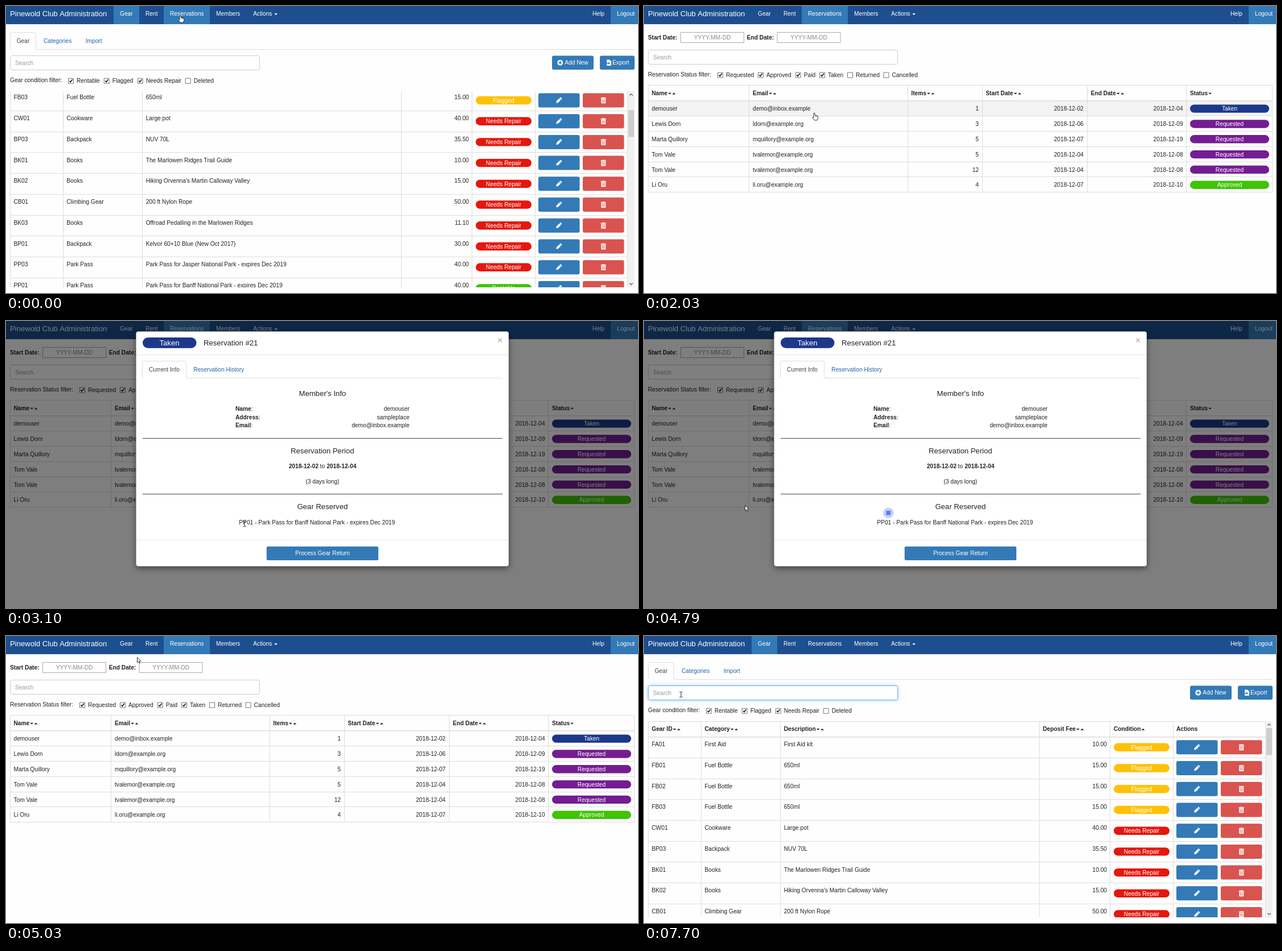
These frames come from a looping animation (1110x505 px, 8000 ms). An HTML page with a canvas:

```html
<!DOCTYPE html>
<html lang="en">
<head>
<meta charset="utf-8">
<title>Club administration</title>
<style>
html, body { margin: 0; width: 100%; height: 100%; overflow: hidden; background: #fefefe; }
canvas { display: block; }
</style>
</head>
<body>
<canvas id="stage" width="1110" height="505"></canvas>
<script>
const W = 1110, H = 505, LOOP = 8000;
const FACE = '"Liberation Sans", Arial, sans-serif';
const BODY = `10.2px ${FACE}`, BOLD = `bold 10.2px ${FACE}`, TITLE = `13.1px ${FACE}`;
const PAPER = '#fefefe', INK = '#222', NAVY = '#1d4f8f', BLUE = '#337ab7', RED = '#d9534f';
const LINK = '#2166ad', RULE = '#ddd', MUTED = '#999';
const PILLS = {
  Flagged: '#ffc107', 'Needs Repair': '#e6170c', Rentable: '#3fc406',
  Taken: '#1c388a', Requested: '#741c92', Approved: '#3fc406'
};

const gear = [
  ['FA01', 'First Aid', 'First Aid kit', '10.00'],
  ['FB01', 'Fuel Bottle', '650ml', '15.00'],
  ['FB02', 'Fuel Bottle', '650ml', '15.00'],
  ['FB03', 'Fuel Bottle', '650ml', '15.00'],
  ['CW01', 'Cookware', 'Large pot', '40.00'],
  ['BP03', 'Backpack', 'NUV 70L', '35.50'],
  ['BK01', 'Books', 'The Marlowen Ridges Trail Guide', '10.00'],
  ['BK02', 'Books', "Hiking Orvenna's Martin Calloway Valley", '15.00'],
  ['CB01', 'Climbing Gear', '200 ft Nylon Rope', '50.00'],
  ['BK03', 'Books', 'Offroad Pedalling in the Marlowen Ridges', '11.10'],
  ['BP01', 'Backpack', 'Kelvor 60+10 Blue (New Oct 2017)', '30.00'],
  ['PP03', 'Park Pass', 'Park Pass for Jasper National Park - expires Dec 2019', '40.00'],
  ['PP01', 'Park Pass', 'Park Pass for Banff National Park - expires Dec 2019', '40.00']
];
const condition = i => i < 4 ? 'Flagged' : i < 12 ? 'Needs Repair' : 'Rentable';

const member = { name: 'demouser', address: 'sampleplace', email: 'demo@inbox.example' };
const bookings = [
  [member.name, member.email, '1', '02', '04', 'Taken'],
  ['Lewis Dorn', 'ldorn@example.org', '3', '06', '09', 'Requested'],
  ['Marta Quillory', 'mquillory@example.org', '5', '07', '19', 'Requested'],
  ['Tom Vale', 'tvalemor@example.org', '5', '04', '08', 'Requested'],
  ['Tom Vale', 'tvalemor@example.org', '12', '04', '08', 'Requested'],
  ['Li Oru', 'li.oru@example.org', '4', '07', '10', 'Approved']
];

// Pointer stops: start time, shape, x, y
const pointer = [
  [0, 'hand', 306, 16], [650, 'arrow', 313, 102], [790, 'hand', 300, 205], [930, 'hand', 296, 220],
  [1050, 'hand', 289, 231], [1170, 'hand', 286, 228], [1300, 'hand', 284, 215], [1420, 'hand', 283, 203],
  [1540, 'hand', 282, 191], [1910, 'hand', 286, 185], [2030, 'hand', 299, 188],
  [2280, 'arrow', 305, 202], [2400, 'arrow', 320, 235], [2540, 'arrow', 351, 288], [2710, 'arrow', 446, 371],
  [2860, 'arrow', 440, 369], [2980, 'beam', 428, 361], [3100, 'beam', 419, 357],
  [3470, 'beam', 424, 356], [3590, 'beam', 418, 352], [3710, 'arrow', 385, 345], [3830, 'arrow', 335, 333],
  [3950, 'arrow', 280, 320], [4070, 'arrow', 230, 307], [4190, 'arrow', 194, 301], [4310, 'arrow', 184, 308],
  [4430, 'arrow', 179, 316], [4550, 'arrow', 177, 324], [4910, 'arrow', 205, 180],
  [5030, 'arrow', 230, 37], [5150, 'hand', 222, 11], [5320, 'hand', 211, 10],
  [6210, 'arrow', 160, 43], [6350, 'hand', 138, 58], [6470, 'arrow', 106, 78],
  [6590, 'beam', 78, 95], [6710, 'beam', 60, 102], [7210, 'beam', 65, 103]
];
// Dialog stops: start time, opacity, vertical shift
const dialogStops = [[0, 0, 0], [2280, .32, -78], [2400, 1, -26], [2540, 1, 0], [4910, .3, -52], [5030, 0, 0]];

const stage = document.getElementById('stage').getContext('2d');
let c = stage;

const at = (stops, t) => stops.findLast(s => s[0] <= t);

function text(s, x, y, color = INK, align = 'left', font = BODY) {
  c.font = font;
  c.fillStyle = color;
  c.textAlign = align;
  c.fillText(s, x, y + (font === TITLE ? 4.6 : 3.7));
  return c.measureText(s).width;
}

function rect(x, y, w, h, color) {
  c.fillStyle = color;
  c.fillRect(x, y, w, h);
}

function box(x, y, w, h, r, fill, stroke) {
  c.beginPath();
  c.roundRect(x, y, w, h, r);
  if (fill) { c.fillStyle = fill; c.fill(); }
  if (stroke) { c.strokeStyle = stroke; c.lineWidth = 1; c.stroke(); }
}

function shape(points, fill, stroke) {
  c.beginPath();
  points.forEach(([x, y]) => c.lineTo(x, y));
  c.closePath();
  c.fillStyle = fill;
  c.fill();
  if (stroke) { c.strokeStyle = stroke; c.lineWidth = .9; c.stroke(); }
}

const hline = (x1, x2, y, color = RULE, w = 1) => rect(x1, Math.round(y), x2 - x1, w, color);
const vline = (x, y1, y2) => rect(x, y1, 1, y2 - y1, RULE);

function disc(x, y, r, color) {
  c.beginPath();
  c.arc(x, y, r, 0, 7);
  c.fillStyle = color;
  c.fill();
}

function caret(x, y, dir, color = INK) {
  shape([[x - 2.9, y - 1.4 * dir], [x + 2.9, y - 1.4 * dir], [x, y + 1.5 * dir]], color);
}

// dirs lists the sort carets: 1 points down, -1 points up
function heading(s, x, y, dirs) {
  const end = x + text(s, x, y, INK, 'left', BOLD);
  dirs.forEach((d, i) => caret(end + 4 + 7.3 * i, y + .8, d));
}

function pill(label, x, y, w) {
  box(x, y - 7.2, w, 14.4, 7.2, PILLS[label]);
  text(label, x + w / 2, y, '#fff', 'center');
}

function checkbox(x, y, label, on) {
  box(x - 4.5, y - 4, 9, 9, 0, '#fff', '#777');
  if (on) {
    c.beginPath();
    c.moveTo(x - 2.6, y + .4);
    c.lineTo(x - .7, y + 2.5);
    c.lineTo(x + 2.8, y - 2.2);
    c.strokeStyle = '#111';
    c.lineWidth = 1.5;
    c.stroke();
  }
  text(label, x + 10, y);
}

function searchBox(y, glow = 0) {
  if (glow) {
    c.save();
    c.shadowColor = `rgba(102,175,233,${.7 * glow})`;
    c.shadowBlur = 6;
    box(7.5, y, 438, 25, 3, '#fff');
    c.restore();
  }
  box(7.5, y, 438, 25, 3, '#fff', glow > .9 ? '#66afe9' : glow ? '#99bddb' : '#ccc');
  text('Search', 16, y + 12.3, MUTED);
}

function tab(x, w, top, label, left, right, color) {
  const base = top + 30;
  hline(left, right, base);
  box(x + .5, top + .5, w, 32, [3, 3, 0, 0], null, RULE);
  rect(x - 1, base, w + 3, 4, color);
  hline(left, x, base);
  hline(x + w + 1, right, base);
  text(label, x + .5 + w / 2, top + 15.3, '#444', 'center');
}

function navbar(active, hovered) {
  rect(0, 0, W, 32, NAVY);
  const items = [['Gear', 189, 45], ['Rent', 234, 43], ['Reservations', 277, 81], ['Members', 358, 64], ['Actions', 423, 65]];
  text('Pinewold Club Administration', 7, 13.5, '#fff', 'left', TITLE);
  for (const [label, x, w] of items) {
    if (label === active || label === hovered) rect(x, 0, w, 32, BLUE);
    text(label, x + 11, 13.5, '#fff');
  }
  caret(474, 14.5, 1, '#fff');
  rect(1062, 0, 48, 32, BLUE);
  text('Help', 1030, 13.5, '#fff');
  text('Logout', 1073, 13.5, '#fff');
}

function pencil(x, y) {
  c.save();
  c.translate(x, y);
  c.rotate(-Math.PI / 4);
  shape([[-6.6, 0], [-4, -2], [3, -2], [3, 2], [-4, 2]], '#fff');
  rect(3.7, -2, 2.3, 4, '#fff');
  c.restore();
}

function trash(x, y) {
  rect(x - 1.7, y - 5.5, 3.4, 1, '#fff');
  rect(x - 4.7, y - 4.7, 9.4, 1.5, '#fff');
  box(x - 4, y - 2.6, 8, 8, [0, 0, 1, 1], '#fff');
  for (const dx of [-2.3, -.4, 1.5]) rect(x + dx, y - 1.4, .8, 5.4, RED);
}

function gearTable(scroll) {
  const PITCH = 36.72, cols = [7, 100, 239, 694, 818, 929, 1091];
  c.save();
  c.beginPath();
  c.rect(0, 150, 1092, 345);
  c.clip();
  c.translate(0, -scroll);
  hline(7, 1091, 150);
  hline(7, 1091, 177, RULE, 1.5);
  const both = [1, -1], y = 163.5;
  heading('Gear ID', 13.5, y, both);
  heading('Category', 106.5, y, both);
  heading('Description', 245.7, y, both);
  heading('Deposit Fee', 700.5, y, both);
  heading('Condition', 825, y, [-1]);
  heading('Actions', 935, y, []);
  gear.forEach(([id, kind, info, fee], i) => {
    const top = 177.6 + PITCH * i, mid = top + 18.2;
    text(id, 13.5, top + 13);
    text(kind, 106.5, top + 13);
    text(info, 245.7, top + 13);
    text(fee, 813, top + 13, INK, 'right');
    pill(condition(i), 825, mid, 98);
    box(935, mid - 12.5, 72.5, 25, 3, BLUE);
    box(1013, mid - 12.5, 72.5, 25, 3, RED);
    pencil(971, mid);
    trash(1049.3, mid);
    hline(7, 1091, top + PITCH - .5);
  });
  cols.forEach(x => vline(x, 150, 700));
  c.restore();

  rect(1092, 150, 12, 345, '#f1f1f1');
  rect(1093, 162 + scroll * .15, 10, 47.5, '#cdcdcd');
  c.strokeStyle = '#505050';
  c.lineWidth = 1.3;
  for (const [ay, d] of [[156, -1], [489, 1]]) {
    c.beginPath();
    c.moveTo(1095.3, ay - 1.4 * d);
    c.lineTo(1098, ay + 1.4 * d);
    c.lineTo(1100.7, ay - 1.4 * d);
    c.stroke();
  }
}

function gearPage(scroll, glow, blink) {
  tab(7, 45, 46, 'Gear', 7, 1104, PAPER);
  text('Categories', 66, 61.5, LINK);
  text('Import', 139.7, 61.5, LINK);
  searchBox(87.5, glow);
  if (blink) rect(16, 94, 1, 12, '#111');

  box(959, 87.5, 73, 24.5, 3, BLUE);
  disc(973.3, 99.8, 5, '#fff');
  rect(970.3, 99, 6, 1.6, BLUE);
  rect(972.5, 96.8, 1.6, 6, BLUE);
  text('Add New', 981.3, 99.5, '#fff');
  box(1043, 87.5, 61, 24.5, 3, BLUE);
  shape([[1055, 94.5], [1060, 94.5], [1063, 97.5], [1063, 105], [1055, 105]], '#fff');
  rect(1052.5, 100, 6, 1.4, BLUE);
  shape([[1058, 98.3], [1061, 100.7], [1058, 103]], BLUE);
  text('Export', 1065, 99.5, '#fff');

  text('Gear condition filter:', 7, 130.7);
  checkbox(114, 131.3, 'Rentable', true);
  checkbox(176.7, 131.3, 'Flagged', true);
  checkbox(235.7, 131.3, 'Needs Repair', true);
  checkbox(319.7, 131.3, 'Deleted', false);
  gearTable(scroll);
}

function dateField(label, x, boxX) {
  text(label, x, 55.5, INK, 'left', BOLD);
  box(boxX + .5, 46.5, 111, 18, 0, '#fff', '#aaa');
  text('YYYY-MM-DD', boxX + 56, 55.5, '#8c8c8c', 'center');
}

function bookingPage(pointerY) {
  const PITCH = 26.83, FIRST = 166.8, cols = [7, 184.5, 463, 594, 778, 952.5, 1103.5];
  dateField('Start Date:', 7, 64);
  dateField('End Date:', 180.7, 233.5);
  searchBox(77.5);
  text('Reservation Status filter:', 7, 120.3);
  ['Requested', 'Approved', 'Paid', 'Taken', 'Returned', 'Cancelled'].forEach((label, i) =>
    checkbox([134, 205, 270.7, 313, 362, 425.5][i], 121, label, i < 4));

  const hovered = Math.floor((pointerY - FIRST) / PITCH);
  if (bookings[hovered]) rect(7, FIRST + hovered * PITCH, 1097, PITCH, '#f3f3f3');
  hline(7, 1104, 139);
  hline(7, 1104, 166, RULE, 1.5);
  const both = [1, -1], y = 153.3;
  heading('Name', 13.5, y, both);
  heading('Email', 191, y, both);
  heading('Items', 469.3, y, both);
  heading('Start Date', 600.3, y, both);
  heading('End Date', 784.7, y, both);
  heading('Status', 959, y, [1]);
  bookings.forEach(([name, email, count, from, to, status], i) => {
    const mid = FIRST + PITCH * i + 13.8;
    text(name, 13.5, mid);
    text(email, 191, mid);
    text(count, 588, mid, INK, 'right');
    text(`2018-12-${from}`, 772, mid, INK, 'right');
    text(`2018-12-${to}`, 946.7, mid, INK, 'right');
    pill(status, 959, mid, 139);
    hline(7, 1104, FIRST + PITCH * (i + 1) - .5);
  });
  cols.forEach(x => vline(Math.floor(x), 139, 328));
}

const DIALOG_PAD = 100;
function makeDialog() {
  const layer = document.createElement('canvas');
  layer.width = W;
  layer.height = H + DIALOG_PAD;
  c = layer.getContext('2d');
  c.save();
  c.shadowColor = 'rgba(0,0,0,.5)';
  c.shadowBlur = 11;
  c.shadowOffsetY = 3.6;
  box(228.5, 18.5, 654.5, 413, 4, '#fff');
  c.restore();
  box(228.5, 18.5, 654.5, 413, 4, '#fff', 'rgba(0,0,0,.2)');

  box(240, 29, 94.5, 18.7, 9.3, PILLS.Taken);
  text('Taken', 287, 38, '#fff', 'center', TITLE);
  text('Reservation #21', 347, 38, INK, 'left', TITLE);
  text('×', 867.7, 35, '#bbb', 'center', `bold 15px ${FACE}`);
  hline(229, 883, 59, '#e5e5e5');
  tab(239, 77, 70, 'Current Info', 240, 872, '#fff');
  text('Reservation History', 329.3, 85.3, LINK);

  const mid = 555.8;
  text("Member's Info", mid, 127, INK, 'center', TITLE);
  [['Name', member.name], ['Address', member.address], ['Email', member.email]].forEach(([label, value], i) => {
    const y = 154.5 + 14.6 * i;
    const w = text(label, 403, y, INK, 'left', BOLD);
    text(':', 403 + w, y);
    text(value, 708.7, y, INK, 'right');
  });
  hline(240, 872, 206, '#444');
  text('Reservation Period', mid, 228, INK, 'center', TITLE);
  text('2018-12-02', 496.7, 255, INK, 'left', BOLD);
  text('to', mid, 255, INK, 'center');
  text('2018-12-04', 615.3, 255, INK, 'right', BOLD);
  text('(3 days long)', mid, 282.3, INK, 'center');
  hline(240, 872, 304, '#444');
  text('Gear Reserved', mid, 326.7, INK, 'center', TITLE);
  text(`PP01 - ${gear[12][2]}`, 409.3, 354, INK);
  hline(229, 883, 385, '#e5e5e5');
  box(457.7, 396.7, 196.3, 24.3, 2.5, BLUE);
  text('Process Gear Return', mid, 408.7, '#fff', 'center');
  c = stage;
  return layer;
}
const dialog = makeDialog();

function drawPointer(kind, x, y) {
  c.save();
  c.translate(x, y);
  if (kind === 'beam') {
    rect(-.5, -4.5, 1, 9, '#222');
    for (const ey of [-5, 4]) {
      rect(-2.5, ey, 2, 1, '#222');
      rect(.5, ey, 2, 1, '#222');
    }
  } else if (kind === 'arrow') {
    shape([[.5, .5], [.5, 9.8], [2.6, 7.9], [4.1, 11], [5.5, 10.4], [4.1, 7.3], [6.8, 7]], '#fff', '#222');
  } else {
    shape([[-1, .8], [0, 0], [1, .8], [1.2, 4.4], [5, 5], [6.6, 6.4], [6.6, 9.4], [5.2, 13],
      [.2, 13], [-3.4, 8.6], [-2.8, 7.4], [-1, 8.6]], '#fff', '#222');
    for (const fx of [2.2, 4.2]) rect(fx, 5, .7, 2, '#222');
  }
  c.restore();
}

function draw(t) {
  const [, kind, x, y] = at(pointer, t);
  const [, alpha, shift] = at(dialogStops, t);
  const onBookings = t >= 250 && t < 5830;

  rect(0, 0, W, H, PAPER);
  if (onBookings) bookingPage(alpha ? 0 : y);
  else gearPage(t < 250 ? 140 : 0, t >= 7330 ? 1 : t >= 7210 ? .5 : 0, t >= 7210 && t < 7700);
  navbar(onBookings ? 'Reservations' : 'Gear', t < 250 ? 'Reservations' : t >= 5150 ? 'Gear' : '');

  if (alpha) {
    rect(0, 0, W, H, `rgba(0,0,0,${alpha / 2})`);
    c.globalAlpha = alpha;
    c.drawImage(dialog, 0, shift);
    c.globalAlpha = 1;
    if (t >= 3590 && t < 4910) {
      disc(429.3, 337.7, 9.2, '#cacaf6');
      rect(425.5, 334, 7.5, 7.5, '#4a86e8');
    }
  }
  drawPointer(kind, x, y);
}

function tick() {
  draw(performance.now() % LOOP);
  requestAnimationFrame(tick);
}
tick();
</script>
</body>
</html>
```
